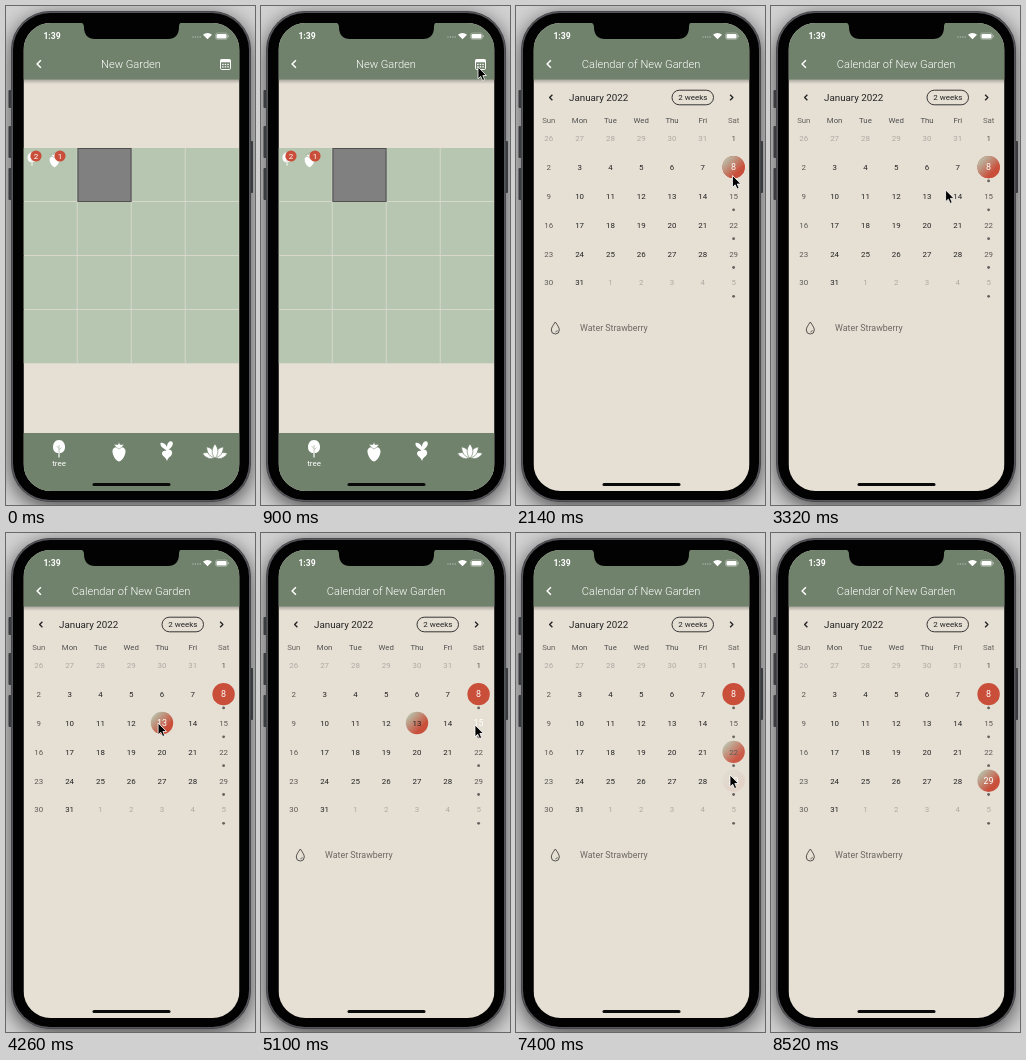
These frames come from a looping animation (249 px wide and 499 px high, 8540 ms). An HTML page with a canvas:

```html
<!DOCTYPE html>
<html lang="en">
<head>
<meta charset="utf-8">
<title>Garden calendar</title>
<style>
  html, body { margin: 0; width: 100%; height: 100%; overflow: hidden; background: #cfcfcf; }
  canvas { display: block; width: 249px; height: 499px; }
</style>
</head>
<body>
<canvas id="stage"></canvas>
<script>
const W = 249, H = 499, LOOP = 8540;
const GREEN = '#70826c', LEAF = '#b7c6b0', BEIGE = '#e5dfd4', RED = '#c94f3b', INK = '#242424';
const SCREEN = { x: 17.5, y: 17, w: 216, h: 468 };

const canvas = document.getElementById('stage');
const ctx = canvas.getContext('2d');
const ratio = window.devicePixelRatio || 1;
canvas.width = W * ratio;
canvas.height = H * ratio;

// Pointer path: time, x, y of the tip
const POINTER = [
  [100, 24, 325], [900, 217, 61], [1700, 217, 61], [2080, 217, 169], [2200, 216, 170],
  [2560, 197, 186], [2840, 213, 172], [2960, 212, 173], [3540, 157, 189], [4330, 152, 190],
  [4560, 184, 182], [4800, 213, 191], [4940, 214, 192], [5500, 214, 192], [5920, 212, 184],
  [6000, 216, 221], [6600, 216, 221], [7080, 214, 242], [7500, 214, 242], [7820, 162, -14]
];
const TAPS = [[-1000, 8], [3860, 13], [5100, 15], [6280, 22], [7380, 29]];
const FADE = 250;

const clamp = v => Math.max(0, Math.min(1, v));
const mix = (a, b, k) => a + (b - a) * k;
const smooth = k => k * k * (3 - 2 * k);

function bezierEase(x, x1, y1, x2, y2) {
  const at = (s, a, b) => 3 * (1 - s) ** 2 * s * a + 3 * (1 - s) * s * s * b + s ** 3;
  let lo = 0, hi = 1;
  for (let i = 0; i < 20; i++) {
    const mid = (lo + hi) / 2;
    if (at(mid, x1, x2) < x) lo = mid; else hi = mid;
  }
  return at(lo, y1, y2);
}

function pushProgress(t) {
  if (t < 1200) return 0;
  return t >= 1580 ? 1 : bezierEase(clamp((t - 1160) / 400), .35, .91, .33, .97);
}

function rect(x, y, w, h, fill) {
  ctx.fillStyle = fill;
  ctx.fillRect(x, y, w, h);
}

function roundRect(x, y, w, h, r, fill) {
  ctx.beginPath();
  ctx.roundRect(x, y, w, h, r);
  if (fill) { ctx.fillStyle = fill; ctx.fill(); }
}

function disc(x, y, r, fill) {
  ctx.beginPath();
  ctx.arc(x, y, r, 0, 7);
  ctx.fillStyle = fill;
  ctx.fill();
}

function text(str, x, y, size, color, { weight = 400, align = 'center' } = {}) {
  ctx.font = `${weight} ${size}px Roboto, sans-serif`;
  ctx.textAlign = align;
  ctx.fillStyle = color;
  ctx.fillText(str, x, y + size * .36);
}

function shape(d, x, y, { fill, stroke, width = 1, scale = 1 }) {
  const path = new Path2D(d);
  ctx.save();
  ctx.translate(x, y);
  ctx.scale(scale, scale);
  if (fill) { ctx.fillStyle = fill; ctx.fill(path); }
  if (stroke) {
    ctx.strokeStyle = stroke;
    ctx.lineWidth = width;
    ctx.lineJoin = 'round';
    ctx.stroke(path);
  }
  ctx.restore();
}

function chevron(x, y, size, dir, color, width) {
  shape(`M${-dir * size / 2} ${-size}L${dir * size / 2} 0L${-dir * size / 2} ${size}`, x, y, { stroke: color, width });
}

function header(title) {
  const shade = ctx.createLinearGradient(0, 73, 0, 78);
  shade.addColorStop(0, 'rgba(0,0,0,.28)');
  shade.addColorStop(1, 'rgba(0,0,0,0)');
  rect(SCREEN.x, 73, SCREEN.w, 5, shade);
  rect(SCREEN.x, SCREEN.y, SCREEN.w, 56.5, GREEN);
  chevron(33, 58, 3.8, -1, '#fff', 1.5);
  text(title, 125, 58.5, 11.1, '#fff', { weight: 300 });
}

function tree(x, y, scale = 1) {
  shape('M0-10C4-10 6-6.500 6-3C6 1 3.500 3 .6 3V7.500H-.6V3C-3.500 3-6 1-6-3C-6-6.500-4-10 0-10Z', x, y, { fill: '#fff', scale });
  shape('M0-5V3M0 0L2.500-2.500M0-1.500L-2.500-4', x, y, { stroke: '#9aa795', width: .6, scale });
}

function strawberry(x, y, scale = 1) {
  shape('M0-4C3-6 7-4 6.500 0C6 5 2 9.500 0 9.500C-2 9.500-6 5-6.500 0C-7-4-3-6 0-4Z', x, y, { fill: '#fff', scale });
  shape('M0-10L1-7.500L5-7.500L2.500-4.500L0-3L-2.500-4.500L-5-7.500L-1-7.500Z', x, y, { fill: '#fff', stroke: GREEN, width: .5, scale });
}

function radish(x, y) {
  shape('M-1 1C3-2 6 1 5 4C4 7 1 7 .3 10.500H-.4C-1 7-4 7-5 4C-5.500 2-3 0-1 1Z', x, y, { fill: '#fff' });
  shape('M-.5 1C-2-2-7-2-6.500-7C-3-8-1-5 0-3C0-7 3-10 5.500-8C7-4 3-2 .5 1Z', x, y, { fill: '#fff' });
}

function lotus(x, y) {
  const petal = 'M0 7C-4 3-4-3 0-8C4-3 4 3 0 7Z';
  for (const [angle, size] of [[-72, .95], [72, .95], [-38, 1], [38, 1], [0, 1]]) {
    ctx.save();
    ctx.translate(x, y + 6);
    ctx.rotate(angle * Math.PI / 180);
    shape(petal, 0, -6, { fill: '#fff', stroke: GREEN, width: .7, scale: size * .95 });
    ctx.restore();
  }
}

function calendarIcon(x, y) {
  ctx.strokeStyle = '#fff';
  ctx.lineWidth = 1;
  roundRect(x - 5, y - 4.5, 10, 10, 1.2);
  ctx.stroke();
  rect(x - 5, y - 4.5, 10, 2.8, '#fff');
  for (let i = 0; i < 6; i++) rect(x - 3.4 + i % 3 * 2.6, y + (i < 3 ? -.2 : 2.2), 1.5, 1.3, '#fff');
}

function badge(x, y, label) {
  disc(x, y, 5.6, RED);
  text(label, x, y, 8, '#fff');
}

function gardenPage() {
  rect(SCREEN.x, SCREEN.y, SCREEN.w, SCREEN.h, BEIGE);
  header('New Garden');
  calendarIcon(219.5, 58);
  for (let i = 0; i < 16; i++) {
    rect(17.5 + i % 4 * 54, 142 + (i >> 2) * 54, 53.3, 53.3, LEAF);
  }
  rect(71.5, 142, 54, 54, '#808080');
  ctx.strokeStyle = '#505050';
  ctx.lineWidth = 1;
  ctx.strokeRect(72, 142.5, 53, 53);
  tree(26, 154, .75);
  strawberry(48.500, 154, .75);
  badge(30, 150, '2');
  badge(54, 150, '1');

  rect(SCREEN.x, 427, SCREEN.w, 58, GREEN);
  tree(53, 444);
  text('tree', 53, 457, 8, '#fff');
  strawberry(113, 446);
  radish(161, 444);
  lotus(209, 445.5);
}

function selectionOf(t) {
  let last = 0;
  TAPS.forEach(([start], i) => { if (t >= start) last = i; });
  const [start, day] = TAPS[last];
  const k = clamp((t - start) / FADE);
  return { day, alpha: n => n === day ? k : last && n === TAPS[last - 1][1] ? 1 - k : 0 };
}

function dayCell(i, selection) {
  const x = 32.8 + i % 7 * 30.8, y = 132.3 + Math.floor(i / 7) * 28.85;
  const n = i - 5, outside = n < 1 || n > 31, weekend = i % 7 === 0 || i % 7 === 6;
  const alpha = selection.alpha(n);
  if (n === 8) disc(x, y, 11.2, RED);
  if (alpha > 0) {
    const blend = ctx.createLinearGradient(x - 9, y - 9, x + 9, y + 9);
    blend.addColorStop(0, LEAF);
    blend.addColorStop(.75, RED);
    blend.addColorStop(1, RED);
    ctx.globalAlpha = alpha;
    disc(x, y, 11.2, blend);
    ctx.globalAlpha = 1;
  }
  const lit = n === 8 || n === selection.day;
  const color = lit ? '#fff' : outside ? '#aeaaa3' : weekend ? '#5c5a57' : INK;
  text((n + 30) % 31 + 1 || 31, x, y, lit ? 8.9 : 7.9, color);
  if (i % 7 === 6 && n > 1) disc(x, y + 13.8, 1.4, '#66635f');
}

function calendarPage(t) {
  rect(SCREEN.x, SCREEN.y, SCREEN.w, SCREEN.h, BEIGE);
  header('Calendar of New Garden');
  chevron(35, 91.5, 2.8, -1, INK, 1.3);
  chevron(215.5, 91.5, 2.8, 1, INK, 1.3);
  text('January 2022', 53, 91.5, 9.8, INK, { align: 'left' });
  ctx.strokeStyle = INK;
  ctx.lineWidth = .9;
  roundRect(156, 84.2, 41.5, 14.6, 7.3);
  ctx.stroke();
  text('2 weeks', 176.8, 91.5, 8, INK);

  ['Sun', 'Mon', 'Tue', 'Wed', 'Thu', 'Fri', 'Sat'].forEach((name, i) =>
    text(name, 32.8 + i * 30.8, 114, 7.8, i % 6 ? '#4f4f4f' : '#66635f'));
  const selection = selectionOf(t);
  // Days from the previous month run 26 to 31
  for (let i = 0; i < 42; i++) dayCell(i, selection);

  if (selection.day !== 13) {
    shape('M0-6C2-3 4-.5 4 2A4 4 0 0 1-4 2C-4-.5-2-3 0-6Z', 39.3, 322, { stroke: '#55534f', width: 1 });
    shape('M2 2A2 2 0 0 1 0 4', 39.3, 322, { stroke: '#55534f', width: .7 });
    text('Water Strawberry', 64, 322, 8.87, '#6b6862', { align: 'left' });
  }
}

function phoneBody() {
  rect(0, 0, W, H, '#d2d2d2');
  ctx.save();
  ctx.shadowColor = 'rgba(0,0,0,.65)';
  ctx.shadowBlur = 20 * ratio;
  ctx.shadowOffsetY = 5 * ratio;
  roundRect(5, 5, 240, 491, 39, '#3b3c40');
  ctx.restore();
  for (const [x, y, h] of [[2.5, 84, 18], [2.5, 120, 32], [2.5, 162, 32], [244, 135, 52]]) {
    roundRect(x, y, 3, h, 1, '#3a3b3e');
  }
  roundRect(5.5, 5.5, 239, 490, 38.5, '#55565a');
  roundRect(7, 7, 236, 487, 37, '#020202');
}

function statusBar() {
  shape('M72 16H178C174 16 173 18 173 21C173 29 169 33 162 33H89C82 33 78 29 78 21C78 18 76 16 72 16Z', 0, 0, { fill: '#020202' });
  text('1:39', 46, 30.3, 8.6, '#fff', { weight: 600 });
  for (let i = 0; i < 4; i++) disc(187 + i * 2.4, 31, .7, 'rgba(255,255,255,.45)');
  shape('M0 3L-4.500-1.500A6.400 6.400 0 0 1 4.500-1.500Z', 201.5, 30.3, { fill: '#fff' });
  ctx.strokeStyle = 'rgba(255,255,255,.5)';
  ctx.lineWidth = .6;
  roundRect(209.5, 27, 12, 6.4, 2);
  ctx.stroke();
  roundRect(210.5, 28, 10, 4.4, 1.2, '#fff');
  rect(222.2, 29.2, .8, 2, 'rgba(255,255,255,.5)');
}

function pointer(t) {
  const next = POINTER.findIndex(([time]) => time > t);
  if (next < 1) return;
  const [t0, x0, y0] = POINTER[next - 1], [t1, x1, y1] = POINTER[next];
  const k = smooth((t - t0) / (t1 - t0));
  shape('M0 0V11.800L2.700 9.300L4.600 13.500L6.600 12.600L4.800 8.500H8.400Z',
    mix(x0, x1, k), mix(y0, y1, k), { fill: '#000', stroke: '#fff', width: .8 });
}

function draw(t) {
  ctx.setTransform(ratio, 0, 0, ratio, 0, 0);
  phoneBody();
  ctx.save();
  roundRect(SCREEN.x, SCREEN.y, SCREEN.w, SCREEN.h, 27);
  ctx.clip();
  const p = pushProgress(t);
  if (p < 1) {
    ctx.save();
    ctx.translate(-72 * p, 0);
    gardenPage();
    ctx.restore();
  }
  if (p > 0) {
    ctx.save();
    ctx.translate(SCREEN.w * (1 - p), 0);
    const shade = ctx.createLinearGradient(SCREEN.x - 18, 0, SCREEN.x, 0);
    shade.addColorStop(0, 'rgba(0,0,0,0)');
    shade.addColorStop(1, 'rgba(0,0,0,.28)');
    rect(SCREEN.x - 18, SCREEN.y, 18, SCREEN.h, shade);
    calendarPage(t);
    ctx.restore();
  }
  statusBar();
  roundRect(86.5, 477, 78, 3, 1.5, '#0a0a0a');
  ctx.restore();
  pointer(t);
}

function frame() {
  draw(performance.now() % LOOP);
  requestAnimationFrame(frame);
}
frame();
</script>
</body>
</html>
```
